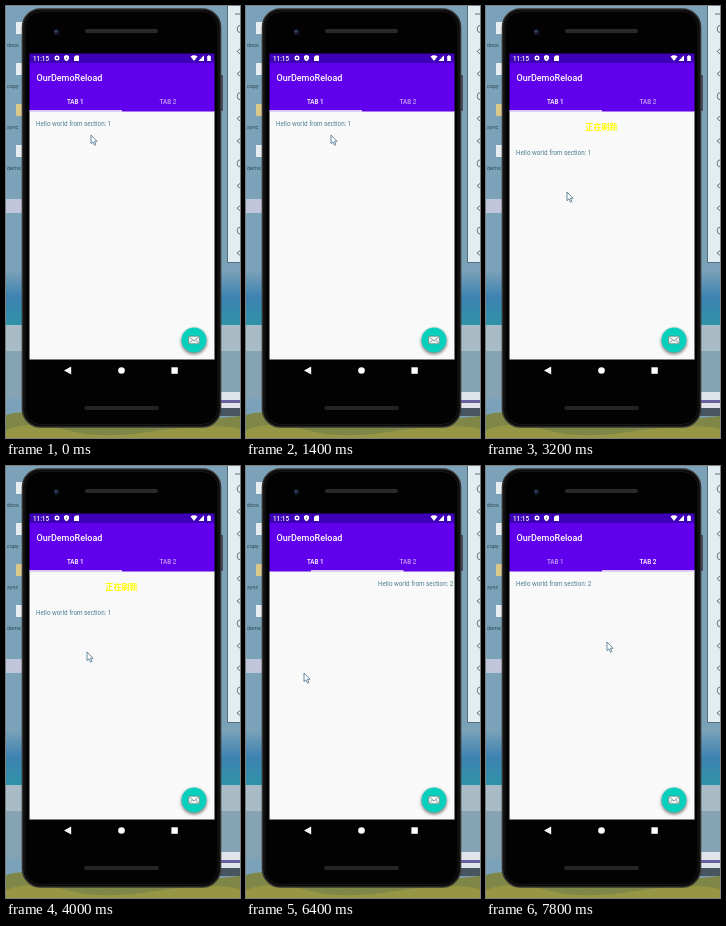
Write an HTML page that moves like this. It is 234x432 px and loops after 8 s.

```html
<!DOCTYPE html>
<html lang="en">
<head>
<meta charset="utf-8">
<title>Pull to refresh</title>
<style>
html, body { margin: 0; width: 100%; height: 100%; overflow: hidden; background: #7ba2b8; }
svg { display: block; width: 100vw; height: 100vh; }
text { font-family: Roboto, "Noto Sans CJK SC", "Noto Sans CJK", sans-serif; font-size: 6.3px; }
.medium { font-weight: 500; fill: #fff; }
.body { fill: #4f7f91; }
#status { font-size: 8.1px; font-weight: 700; text-anchor: middle; }
.label { font-size: 5.5px; fill: #2f4756; }
</style>
</head>
<body>
<svg viewBox="0 0 234 432">
  <defs>
    <linearGradient id="sea" x2="0" y2="1">
      <stop offset="0" stop-color="#7ba2b8"/>
      <stop offset=".5" stop-color="#3d82b0"/>
      <stop offset="1" stop-color="#2f93a8"/>
    </linearGradient>
    <filter id="blur" x="-50%" y="-50%" width="200%" height="200%">
      <feGaussianBlur stdDeviation="1.4"/>
    </filter>
    <clipPath id="page"><path d="M23.5 105.6H208.5V353.5H23.5z"/></clipPath>
  </defs>

  <!-- desktop -->
  <path fill="#7ba2b8" d="M0 0H234V432H0z"/>
  <path fill="#c0c5da" d="M0 193H17V207H0z"/>
  <path fill="url(#sea)" d="M0 264H234V319H0z"/>
  <path fill="#a9bcc6" d="M0 319H234V350H0z"/>
  <path fill="#86a3b3" d="M0 345H234V392H0z"/>
  <path fill="#dfe5ea" d="M212 386H234V402H212z"/>
  <path fill="#6a62a0" d="M214 394H234V397H214z"/>
  <path fill="#465560" d="M212 402H234V410H212z"/>
  <path fill="#7f8748" d="M0 409Q20 402 45 413T120 420T234 410V432H0z"/>
  <path fill="#979644" d="M0 424Q25 414 60 424T150 425T234 423V432H0z"/>
  <g id="desktop"></g>

  <!-- emulator toolbar -->
  <path fill="#e2edf2" stroke="#567080" d="M221.5 -1H236V256.5H221.5z"/>
  <path stroke="#66747c" d="M229 8H234"/>
  <g id="tools" fill="none" stroke="#66747c"></g>

  <!-- phone -->
  <rect x="213" y="69" width="4" height="36" rx="1" fill="#4a4d5c"/>
  <rect x="16.5" y="3" width="198" height="418" rx="18" fill="#080808" stroke="#343230" stroke-width="1.6"/>
  <rect x="19" y="5.5" width="193" height="413" rx="16" fill="#020202" stroke="#171717"/>
  <rect x="79" y="23" width="73" height="4" rx="2" fill="#292929"/>
  <rect x="78" y="400" width="75" height="4" rx="2" fill="#242424"/>
  <circle cx="50.5" cy="26" r="3.2" fill="#10161f"/>
  <circle cx="50" cy="25.5" r="1.3" fill="#3a4f78"/>

  <!-- content -->
  <path fill="#f9f9f9" d="M23.5 105H208.5V353.5H23.5z"/>
  <g clip-path="url(#page)">
    <g id="pages" class="body">
      <text x="30" y="120.2">Hello world from section: 1</text>
      <text x="215" y="120.2">Hello world from section: 2</text>
    </g>
    <text id="status" x="115.5"></text>
  </g>

  <!-- app bar -->
  <path fill="#6000ed" d="M23.5 56H208.5V105.6H23.5z"/>
  <path fill="#3d00b7" d="M23.5 47.5H208.5V57H23.5z"/>
  <text class="medium" x="27" y="54.6">11:15</text>
  <g fill="#fff">
    <circle cx="51" cy="52" r="1.8" fill="none" stroke="#fff" stroke-width="1.4"/>
    <path d="M60.5 49L63 50V52.5Q62.5 54.5 60.5 55.2Q58.5 54.5 58 52.5V50z"/>
    <path d="M69.5 49.5H73V55H68V51z"/>
    <path d="M184.5 50.5Q188 47.8 191.5 50.5L188 55z"/>
    <path d="M198 49.3V55H192.5z"/>
    <path d="M201.2 50H202.2V49.2H203.8V50H204.8V55H201.2z"/>
    <path d="M60 52.3H61" stroke="#3d00b7"/>
  </g>
  <text class="medium" x="30.5" y="74.8" style="font-size:9px">OurDemoReload</text>
  <g class="medium" text-anchor="middle">
    <text id="tab1" x="69.3" y="97.6">TAB 1</text>
    <text id="tab2" x="162" y="97.6">TAB 2</text>
  </g>
  <rect id="indicator" y="104.2" width="92.5" height="1.5" fill="#f5f5fa"/>

  <!-- mail button -->
  <circle cx="188" cy="335.5" r="13" opacity=".45" filter="url(#blur)"/>
  <circle cx="188" cy="334" r="12.5" fill="#08d0bd"/>
  <rect x="182.6" y="330.2" width="10.8" height="7.6" rx=".6" fill="#f2f5f4" stroke="#68827f" stroke-width=".7"/>
  <path d="M183 330.7L188 335L193 330.7M183 337.4L186.4 334M193 337.4L189.6 334" fill="none" stroke="#68827f" stroke-width=".8"/>

  <!-- navigation -->
  <g fill="#fff">
    <path d="M58 364.5L65.2 360.6V368.4z"/>
    <circle cx="115.5" cy="364.5" r="3.3"/>
    <path d="M165.4 361.3H171.8V367.8H165.4z"/>
  </g>

  <path id="cursor" d="M0 0V8.6L2 6.8L3.5 10.2L4.9 9.5L3.5 6.3H6z" fill="#fff" stroke="#476f89" stroke-width=".8"/>
</svg>

<script>
const $ = id => document.getElementById(id);
const LOOP = 8000, STEP = 200;
const HEADER = 29, PAGE = 185;
const PULL_PER_PIXEL = .0195;

const GRAB = 1400, RELEASE = 3000, SUCCESS = 5000, CLOSE = 5600;
const SWIPE = 6000, FLING = 6400;
const start = { x: 85, y: 129 };
const swipeStart = { x: 141, y: 200 };

// Each move: [begin, end, x, y]
const moves = [
  [GRAB, RELEASE, 81, 186],
  [CLOSE, SWIPE, swipeStart.x, swipeStart.y],
  [SWIPE, FLING, 58, 207],
  [7000, 7800, 121, 176]
];

const mix = (a, b, k) => a + (b - a) * k;
const progress = (t, begin, end) => Math.min(1, Math.max(0, (t - begin) / (end - begin)));
const ease = k => k * k * (3 - 2 * k);
const easeOut = k => 1 - (1 - k) ** 3;

function cursorAt(t) {
  return moves.reduce((p, [begin, end, x, y]) => {
    const k = ease(progress(t, begin, end));
    return { x: mix(p.x, x, k), y: mix(p.y, y, k) };
  }, start);
}

// While held, the content follows the cursor; on release it settles.
function pullAt(t) {
  const held = (cursorAt(Math.min(t, RELEASE)).y - start.y) * PULL_PER_PIXEL;
  const settled = mix(held, 1, easeOut(progress(t, RELEASE, RELEASE + 200)));
  return t < RELEASE ? held : settled * (1 - easeOut(progress(t, CLOSE, CLOSE + 300)));
}

function swipeAt(t) {
  if (t < SWIPE) return 0;
  const held = (swipeStart.x - cursorAt(Math.min(t, FLING)).x) / PAGE;
  return mix(held, 1, easeOut(progress(t, FLING, FLING + 400)));
}

function statusAt(t, pull) {
  if (t < RELEASE) return [`松开刷新 ${Math.round(pull * 100)}%`, "#4f7f91"];
  if (t < SUCCESS) return ["正在刷新", "#ffff00"];
  return ["刷新成功", "#35a044"];
}

function buildDesktop() {
  $("desktop").innerHTML = ["docs", "copy", "sync", "demo"].map((label, i) => {
    const y = 16 + i * 41;
    return `<rect x="10" y="${y}" width="7" height="12" fill="${i === 2 ? "#d8c88a" : "#e6edf1"}"/>
      <text class="label" x="1" y="${y + 25}">${label}</text>`;
  }).join("");
  $("tools").innerHTML = Array.from({ length: 11 }, (_, i) => {
    const y = 23 + i * 22.4;
    return i % 3 ? `<path d="M236 ${y - 4}L231 ${y}L236 ${y + 4}"/>`
                 : `<circle cx="235" cy="${y}" r="3.8"/>`;
  }).join("");
}

function draw(now) {
  const t = Math.floor(now % LOOP / STEP) * STEP;
  const cursor = cursorAt(t), pull = pullAt(t), swipe = swipeAt(t);
  const [label, color] = statusAt(t, pull);
  const offset = pull * HEADER;

  $("cursor").setAttribute("transform", `translate(${cursor.x} ${cursor.y})`);
  $("pages").setAttribute("transform", `translate(${-swipe * PAGE} ${offset})`);
  $("status").textContent = pull > 0 ? label : "";
  $("status").setAttribute("fill", color);
  $("status").setAttribute("y", 94.7 + offset);
  $("indicator").setAttribute("x", 23.5 + swipe * PAGE / 2);
  $("tab1").setAttribute("opacity", swipe < .5 ? 1 : .62);
  $("tab2").setAttribute("opacity", swipe < .5 ? .62 : 1);
  requestAnimationFrame(() => draw(performance.now()));
}

buildDesktop();
draw(performance.now());
</script>
</body>
</html>
```
